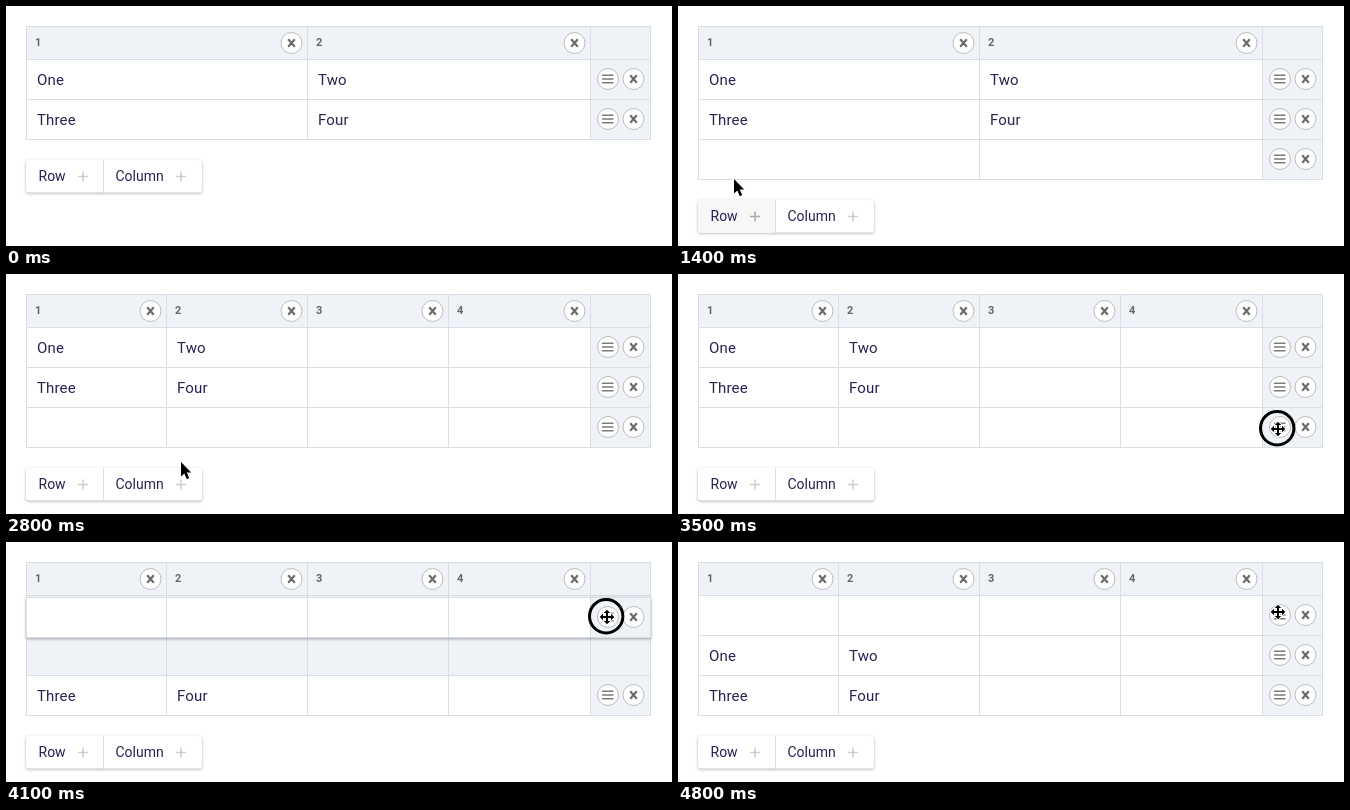
Animation, 666 px wide and 240 px high, one loop 5.2 s. Source, as an HTML page:

```html
<!DOCTYPE html>
<html lang="en">
<head>
<meta charset="utf-8">
<title>Editable table</title>
<style>
  html, body { margin: 0; width: 100%; height: 100%; overflow: hidden; background: #fff; }
  svg { display: block; width: 666px; height: 240px; }
  text { font-family: Roboto, Arial, sans-serif; fill: #2b2152; }
  .cell { font-size: 15px; letter-spacing: .15px; }
  .head { font-size: 11px; font-weight: 700; fill: #666; }
  .label { font-size: 14px; }
  .line { stroke: #d9dee4; fill: none; }
  .round { fill: #fff; stroke: #bcbcbc; }
  .cross { stroke: #6a6a6a; stroke-width: 2.1; }
  .bars { stroke: #7c7c7c; stroke-width: 1.6; }
  .lifted { filter: drop-shadow(0 1px 1.5px rgba(0, 0, 0, .35)); }
  .group { fill: #fff; filter: drop-shadow(0 1px 1.5px rgba(0, 0, 0, .3)); }
</style>
</head>
<body>
<svg id="stage" viewBox="0 0 666 240"></svg>
<script>
const LOOP = 5200, LEFT = 20, RIGHT = 645, TOOLS = 584, TOP = 20, HEAD = 53, ROW = 40;
const BLUE = '#eff3f8';
const stage = document.getElementById('stage');

// time, pointer, x, y, top of the lifted row
const steps = [
  [0, 'none', 0, 0],
  [800, 'arrow', 123, 224], [900, 'arrow', 82, 192], [1000, 'hand', 56, 173],
  [1400, 'arrow', 56, 173], [1500, 'arrow', 68, 181], [1600, 'hand', 92, 196],
  [1700, 'hand', 132, 207], [1800, 'hand', 163, 210], [1900, 'hand', 163, 208],
  [2500, 'hand', 164, 213], [2600, 'hand', 167, 221], [2700, 'hand', 171, 213],
  [2800, 'arrow', 175, 188], [2900, 'arrow', 182, 156], [3000, 'arrow', 236, 134],
  [3100, 'arrow', 338, 120], [3200, 'arrow', 450, 124], [3300, 'arrow', 544, 139],
  [3400, 'move', 594, 152], [3500, 'move', 600, 155],
  [3600, 'move', 600, 128, 108], [3700, 'move', 600, 98, 80], [3800, 'move', 600, 88, 69],
  [3900, 'move', 600, 82, 63], [4000, 'move', 601, 78, 58], [4100, 'move', 601, 75, 55],
  [4200, 'move', 601, 70, 50], [4300, 'move', 600, 68, 48], [4400, 'move', 600, 69, 49],
  [4500, 'move', 600, 70], [4700, 'move', 600, 71], [4800, 'move', 600, 70]
];

const rect = (x, y, w, h, fill, extra = '') =>
  `<rect x="${x}" y="${y}" width="${w}" height="${h}" fill="${fill}" ${extra}/>`;
const path = (d, cls) => `<path class="${cls}" d="${d}"/>`;
const text = (s, x, y, cls) => `<text class="${cls}" x="${x}" y="${y}">${s}</text>`;
const hLine = y => path(`M${LEFT} ${y + .5}H${RIGHT}`, 'line');
const vLine = (x, y, h) => path(`M${x + .5} ${y}v${h}`, 'line');
const circle = (x, y) => `<circle class="round" cx="${x}" cy="${y}" r="10.5"/>`;
const closer = (x, y) => circle(x, y) +
  path(`M${x - 3.3} ${y - 3.7}l6.6 7.4m0-7.4l-6.6 7.4`, 'cross');
const grip = (x, y) => circle(x, y) +
  path(`M${x - 6} ${y - 3.7}h11.5m-11.5 3.7h11.5m-11.5 3.7h11.5`, 'bars');
const colStart = (i, n) => Math.floor(LEFT + 1 + i * 563 / n);

function dividers(n, y, h) {
  let out = vLine(LEFT, y, h) + vLine(RIGHT - 1, y, h) + vLine(TOOLS, y, h);
  for (let i = 1; i < n; i++) out += vLine(colStart(i, n) - 1, y, h);
  return out;
}

function header(n) {
  let out = rect(LEFT, TOP, RIGHT - LEFT, HEAD - TOP, BLUE, 'rx="2"') + dividers(n, TOP + 1, HEAD - TOP) + hLine(TOP);
  for (let i = 0; i < n; i++) {
    out += text(i + 1, colStart(i, n) + 8, 40, 'head') +
      closer((i + 1 < n ? colStart(i + 1, n) - 1 : TOOLS) - 15.5, 37);
  }
  return out;
}

function row(words, y, n) {
  return rect(LEFT, y, TOOLS - LEFT, ROW, '#fff') + rect(TOOLS, y, RIGHT - TOOLS, ROW, BLUE) +
    dividers(n, y, ROW) + hLine(y) + hLine(y + ROW) +
    words.map((w, i) => text(w, colStart(i, n) + 10, y + 26, 'cell')).join('') +
    grip(602, y + 20) + closer(627.5, y + 20);
}

const gap = (y, n) => rect(LEFT, y, RIGHT - LEFT, ROW, BLUE) +
  dividers(n, y, ROW) + hLine(y) + hLine(y + ROW);

function buttons(y, hover) {
  const plus = (x, on) =>
    `<path d="M${x - 5} ${y + 16.5}h10m-5-5v10" stroke="${on ? '#aaa' : '#ccc'}" stroke-width="1.5"/>`;
  const tint = hover === 'row' ? rect(20, y, 77, 33, '#f7f7f7', 'rx="2"')
    : hover === 'column' ? rect(98, y, 98, 33, '#f7f7f7', 'rx="2"') : '';
  return `<rect class="group" x="20" y="${y}" width="176" height="32.5" rx="3"/>` + tint +
    path(`M97.5 ${y}v32.5`, 'line') +
    text('Row', 32.5, y + 21, 'label') + plus(77, hover === 'row') +
    text('Column', 109.5, y + 21, 'label') + plus(175, hover === 'column');
}

const pointers = {
  none: '',
  arrow: '<path d="M0 0V14.5L3.3 11.5L5.8 17.2L8.2 16.1L5.8 10.6H10.2Z" fill="#000" stroke="#fff" stroke-width="1.2" paint-order="stroke"/>',
  hand: '<path d="M-2 1.5Q0-1 1.6 1.4L3 6Q4.4 4.8 5.7 6.3Q7.2 5.4 8 7Q9.8 6.6 10 9Q10.2 12 8.7 14.4V17H.5V15.4L-4.8 10.2Q-6.3 8-4.4 7.5Q-2.8 7.5-.4 9.4Z" fill="#fff" stroke="#000" stroke-width="1.2"/>' +
    '<path d="M2.5 10.5v3.7m2.3-3.7v3.7m2.3-3.7v3.7" stroke="#000"/>',
  move: '<path d="M0-7.3L3.2-4H1V-1H4V-3.2L7.3 0L4 3.2V1H1V4H3.2L0 7.3L-3.2 4H-1V1H-4V3.2L-7.3 0L-4-3.2V-1H-1V-4H-3.2Z" fill="#000" stroke="#fff" stroke-width="1.8" paint-order="stroke"/>'
};

function hoverAt(t) {
  if (t >= 1000 && t < 1700) return 'row';
  return t >= 1700 && t < 2800 ? 'column' : '';
}

function scene(t) {
  const [, kind, x, y, lift] = steps.filter(s => s[0] <= t).pop();
  const cols = t < 2100 ? 2 : t < 2400 ? 3 : 4;
  const rows = [['One', 'Two'], ['Three', 'Four']];
  const dragging = lift !== undefined;

  if (dragging) {
    // the gap passes a row once the pointer crosses its middle
    rows.splice(y < 73 ? 0 : y < 113 ? 1 : 2, 0, null);
  } else if (t >= 4500) rows.unshift([]);
  else if (t >= 1300) rows.push([]);

  let out = header(cols);
  rows.forEach((r, i) => {
    const top = HEAD + i * ROW;
    out += r ? row(r, top, cols) : gap(top, cols);
  });
  out += buttons(HEAD + rows.length * ROW + 21, hoverAt(t));
  if (dragging) out += `<g class="lifted">${row([], lift, cols)}</g>`;
  if (t >= 3500 && t < 4500) {
    out += `<circle cx="${x - .8}" cy="${y - .8}" r="16.7" fill="none" stroke="#000" stroke-width="3"/>`;
  }
  return out + `<g transform="translate(${x} ${y})">${pointers[kind]}</g>`;
}

let shown = -1;
const start = performance.now();
function tick() {
  const t = Math.floor((performance.now() - start) % LOOP / 100) * 100;
  if (t !== shown) stage.innerHTML = scene(shown = t);
  requestAnimationFrame(tick);
}
tick();
</script>
</body>
</html>
```
